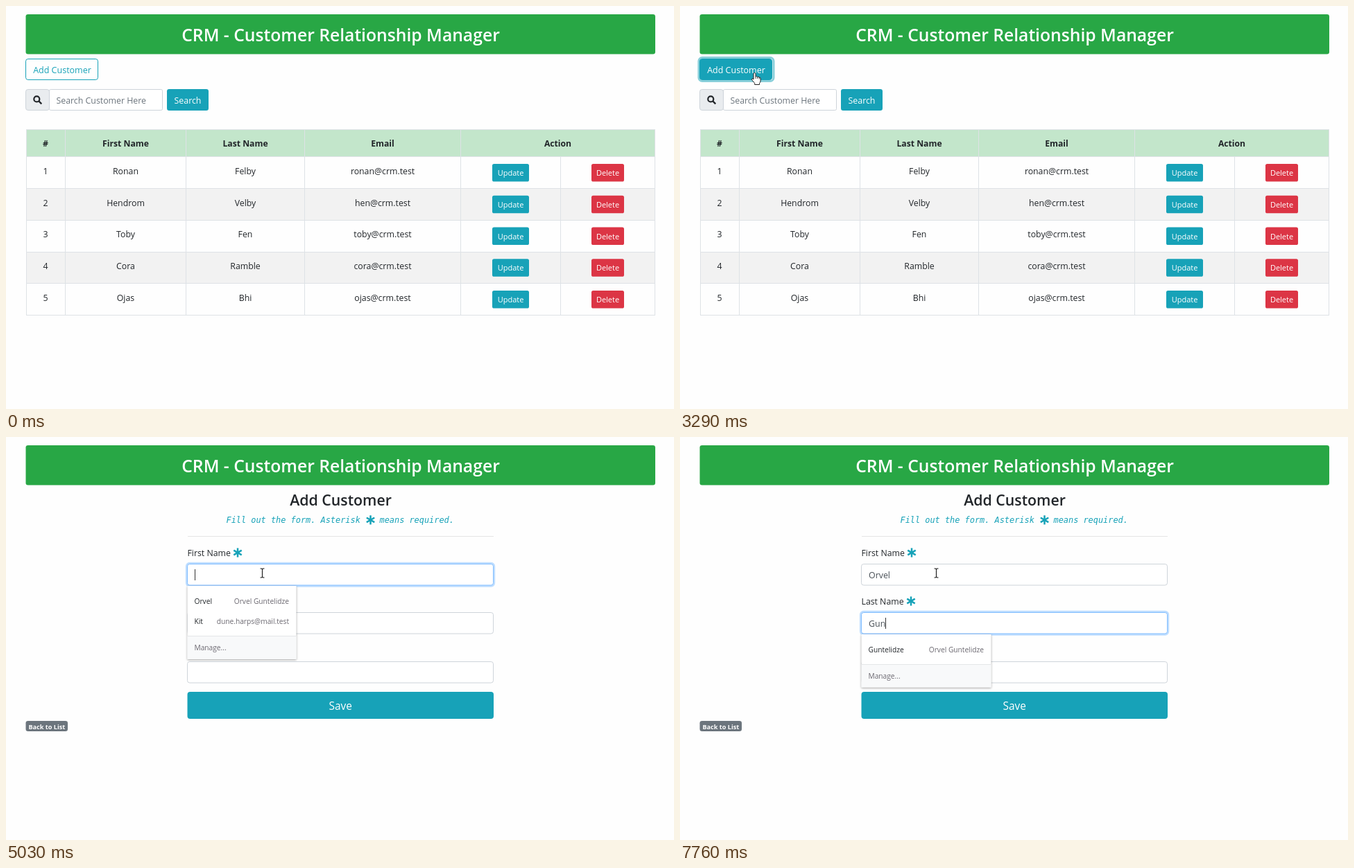
An HTML page that plays this animation: 963 by 582 pixels, repeating every 8000 ms.

```html
<!DOCTYPE html>
<html lang="en">
<head>
<meta charset="utf-8">
<title>Customer manager</title>
<style>
  html, body { margin: 0; width: 100%; height: 100%; overflow: hidden; background: #fefefe; }
  svg { display: block; width: 100%; height: 100%; }
  text { font-family: "Open Sans", sans-serif; white-space: pre; }
  .mono { font-family: "DejaVu Sans Mono", monospace; font-style: italic; }
</style>
</head>
<body>
<svg id="stage" viewBox="0 0 963 582"></svg>
<script>
const LOOP = 8000;
const GREEN = '#28a745', TEAL = '#17a2b8', RED = '#dc3545', INK = '#212529', LINE = '#dee2e6';
const stage = document.getElementById('stage');

const rect = (x, y, w, h, fill, extra = '') =>
  `<rect x="${x}" y="${y}" width="${w}" height="${h}" fill="${fill}" ${extra}/>`;
const box = (x, y, w, h, fill, stroke, r = 3.3) =>
  rect(x + .5, y + .5, w - 1, h - 1, fill, `rx="${r}" stroke="${stroke}"`);
const line = (x1, y1, x2, y2, stroke = LINE) =>
  `<path d="M${x1} ${y1}L${x2} ${y2}" stroke="${stroke}"/>`;
const text = (x, y, size, str, { fill = INK, anchor = 'start', weight = 400, attrs = '' } = {}) =>
  `<text x="${x}" y="${y}" font-size="${size}" fill="${fill}" text-anchor="${anchor}" font-weight="${weight}" ${attrs}>${str}</text>`;
const centered = (x, y, size, str, fill = INK, weight = 400) =>
  text(x, y, size, str, { fill, weight, anchor: 'middle' });

// List page
const COLUMNS = [29.5, 85.5, 259.5, 430.5, 655.5, 799.5, 935.5];
const CENTERS = [57, 172.5, 345, 543];
const ROW_TOP = 217.8, ROW_HEIGHT = 45.75;
const customers = [
  ['Ronan', 'Felby', 'ronan@crm.test'],
  ['Hendrom', 'Velby', 'hen@crm.test'],
  ['Toby', 'Fen', 'toby@crm.test'],
  ['Cora', 'Ramble', 'cora@crm.test'],
  ['Ojas', 'Bhi', 'ojas@crm.test']
];

const header = rect(28.5, 12, 907.5, 57.5, GREEN, 'rx="3.3"') +
  centered(482.5, 51, 24.7, 'CRM - Customer Relationship Manager', '#fff', 600);

function customerRow(cells, i) {
  const y = ROW_TOP + i * ROW_HEIGHT;
  const button = (x, w, label, fill) =>
    rect(x, y + 10.2, w, 25.5, fill, 'rx="2.6"') + centered(x + w / 2, y + 27.4, 11, label, '#fff');
  return (i % 2 ? rect(29, y, 907, ROW_HEIGHT, '#f2f2f2') : '') +
    [i + 1, ...cells].map((cell, c) => centered(CENTERS[c], y + 25, 12.3, cell)).join('') +
    button(701, 53, 'Update', TEAL) + button(844, 47, 'Delete', RED);
}

function table() {
  const heads = ['#', 'First Name', 'Last Name', 'Email'];
  let out = rect(29, 178, 907, 40, '#c3e6cb') + customers.map(customerRow).join('') +
    heads.map((label, c) => centered(CENTERS[c], 203, 12.2, label, INK, 700)).join('') +
    centered(795.5, 203, 12.2, 'Action', INK, 700) + line(29, 178.5, 936, 178.5);
  for (let i = 0; i <= customers.length; i++) {
    const y = Math.floor(ROW_TOP + i * ROW_HEIGHT) + .5;
    out += line(29, y, 936, y);
  }
  return out + COLUMNS.map((x, c) => line(x, c === 5 ? 218 : 178, x, 447)).join('');
}

const searchBar = box(28, 120, 35, 31, '#e9ecef', '#ced4da') +
  box(62, 120, 164, 31, '#fff', '#ced4da', 2) +
  `<g fill="none" stroke="${INK}" stroke-width="2.2"><circle cx="44.3" cy="134.4" r="4"/><path d="M47.3 137.4L51.3 141.4"/></g>` +
  text(72.5, 141, 12.35, 'Search Customer Here', { fill: '#6c757d' }) +
  rect(232, 120, 60, 31, TEAL, 'rx="3.3"') + centered(262, 140.5, 12.4, 'Search', '#fff');

const tableMarkup = table();

function listPage({ hover, press = 0 }) {
  const glow = press ? box(26.5, 74, 109, 35, 'none', TEAL, 5).replace('/>', `stroke-width="3" opacity="${press / 2}"/>`) : '';
  return glow + box(28, 76, 105, 31, hover ? TEAL : '#fefefe', TEAL) +
    centered(81, 96.5, 12.5, 'Add Customer', hover ? '#fff' : TEAL) + searchBar + tableMarkup;
}

// Form page
const FIELD_TOPS = [183, 253, 324];

const asterisk = (x, y) => `<g transform="translate(${x} ${y})" stroke="${TEAL}" stroke-width="2.5">` +
  [0, 60, 120].map(a => `<path d="M0-6.6V6.6" transform="rotate(${a})"/>`).join('') + '</g>';

const mono = (x, str) => text(x, 124, 11.9, str, { fill: TEAL, attrs: 'class="mono"' });

const formBase = centered(482.5, 98.5, 21.3, 'Add Customer', INK, 600) +
  mono(317.5, 'Fill out the form. Asterisk') + asterisk(525.5, 119.8) + mono(538.5, 'means required.') +
  line(262, 143.5, 703, 143.5, '#e5e5e5') +
  [['First Name', 334], ['Last Name', 333], ['Email', 303]].map(([label, x], i) =>
    text(261.5, FIELD_TOPS[i] - 11.3, 12.3, label) + asterisk(x, FIELD_TOPS[i] - 16)).join('') +
  rect(261.5, 368, 441.5, 39, TEAL, 'rx="4"') + centered(482.3, 394, 15.4, 'Save', '#fff') +
  rect(28.5, 410, 60.5, 15, '#6c757d', 'rx="3.3"') +
  centered(58.8, 421.6, 9.15, 'Back to List', '#fff', 700);

function field(top, value = '', glow = 0) {
  return box(261, top, 442, 31.5, '#fff', '#ced4da') +
    (glow ? `<g opacity="${glow}">` + rect(260.2, top - .8, 443.6, 33.1, 'none', 'rx="4.5" stroke="#bfdeff" stroke-width="2.7"') +
      box(261, top, 442, 31.5, '#fff', '#80bdff') + '</g>' : '') +
    text(272, top + 21, 12.4, value, { fill: '#495057' });
}

function suggestions(top, width, rows) {
  const foot = 43 + 29.3 * (rows.length - 1), height = foot + 33.5;
  const right = 261.5 + width;
  return rect(261.5, top, width, height, '#fff', 'style="filter:drop-shadow(0 1px 1.5px #0006)"') +
    rect(261.5, top + foot, width, 33.5, '#f8f9fa') +
    line(261.5, Math.floor(top + foot) + .5, right, Math.floor(top + foot) + .5, '#e4e6e8') +
    rows.map(([value, detail], i) => text(271.5, top + 26 + 29.3 * i, 10.2, value) +
      text(right - 10.5, top + 26 + 29.3 * i, 10.2, detail, { fill: '#6b6870', anchor: 'end' })).join('') +
    text(271.5, top + foot + 20.8, 10.2, 'Manage...', { fill: '#6b6870' });
}

const FIRST = 'Orvel', LAST = 'Guntelidze', FULL = FIRST + ' ' + LAST;
const menus = {
  all: suggestions(215, 157, [[FIRST, FULL], ['Kit', 'dune.harps@mail.test']]),
  first: suggestions(215, 147, [[FIRST, FULL]]),
  last: suggestions(285, 187, [[LAST, FULL]])
};

function formPage({ values = [], glow = [], caret, menu }) {
  return formBase + FIELD_TOPS.map((top, i) =>
    `<g id="field${i}">${field(top, values[i], glow[i])}</g>`).join('') +
    (menu ? menus[menu] : '') +
    (caret === undefined ? '' : `<path id="caret" stroke="#333"/>`);
}

function placeCaret({ caret }) {
  if (caret === undefined) return;
  const width = stage.querySelector(`#field${caret} text`).getComputedTextLength();
  const x = Math.floor(272 + width) + .5, y = FIELD_TOPS[caret] + 8;
  stage.querySelector('#caret').setAttribute('d', `M${x} ${y}v16`);
}

// Pointers, drawn from their hot spot
const pointers = {
  arrow: '<path d="M.5.5V13.5L3.5 10.8L5.7 15.3L7.6 14.4L5.5 10H9.5Z" fill="#fff" stroke="#222"/>',
  beam: '<path d="M-3-6.5H-1L0-5.5L1-6.5H3M0-5.5V5.5M-3 6.5H-1L0 5.5L1 6.5H3" fill="none" stroke="#222" stroke-width="1.2"/>',
  hand: '<path d="M-1.5 10V1.5Q0-.8 1.5 1.5V6Q3 4.8 4 6.5Q5.7 5.5 6.5 7.2Q8.6 6.6 8.6 9V12Q8.4 14.5 7 15.5V17.5H.2V15.5L-4 10.5Q-4.2 8.4-2.5 9Z" fill="#fff" stroke="#222"/>' +
    '<path d="M1.5 6V9M4 6.7V9M6.5 7.4V9.5" stroke="#222" stroke-width=".8"/>'
};

function pointer({ at, click }) {
  if (!at) return '';
  const [kind, x, y] = at;
  return (click ? `<circle cx="${x - .8}" cy="${y}" r="9.7" fill="#ffff3c" opacity=".85"/>` : '') +
    `<g transform="translate(${x} ${y})">${pointers[kind]}</g>`;
}

const list = (time, at, rest) => ({ time, page: listPage, at, ...rest });
const form = (time, at, rest) => ({ time, page: formPage, at, ...rest });
const onButton = ['hand', 107.5, 96], inField = ['beam', 362, 199.5], resting = ['beam', 369.5, 196.5];

const steps = [
  list(0),
  list(520, ['arrow', 799, 564]),
  list(770, ['arrow', 660, 468]),
  list(1020, ['arrow', 490, 368]),
  list(1270, ['arrow', 350, 308]),
  list(1520, ['arrow', 296, 293]),
  list(1790, ['arrow', 240, 238]),
  list(2040, ['arrow', 165, 165]),
  list(2290, ['beam', 123.5, 123.5]),
  list(2540, ['hand', 110, 99], { hover: true }),
  list(2780, onButton, { hover: true }),
  list(3030, onButton, { hover: true, press: .6, click: true }),
  list(3290, onButton, { hover: true, press: 1 }),
  form(3530, ['arrow', 175, 109.5]),
  form(3780, ['arrow', 290, 165]),
  form(4030, inField),
  form(4530, inField, { click: true, caret: 0, menu: 'all', glow: [.15] }),
  form(4780, ['beam', 366, 198], { caret: 0, menu: 'all', glow: [1] }),
  form(5030, resting, { caret: 0, menu: 'all', glow: [1] }),
  ...[[5780, 1], [6020, 3], [6260, 5]].map(([time, n]) =>
    form(time, resting, { values: [FIRST.slice(0, n)], caret: 0, menu: 'first', glow: [1] })),
  form(6530, resting, { values: [FIRST], caret: 1, glow: [.4, .6] }),
  form(6760, resting, { values: [FIRST], caret: 1, glow: [0, 1] }),
  ...[7260, 7510, 7760].map((time, i) =>
    form(time, resting, { values: [FIRST, LAST.slice(0, i + 1)], caret: 1, menu: 'last', glow: [0, 1] }))
];

let shown;
function draw(now) {
  const time = now % LOOP;
  const step = steps.findLast(s => s.time <= time);
  if (step !== shown) {
    stage.innerHTML = header + step.page(step) + pointer(step);
    placeCaret(step);
    shown = step;
  }
}

const start = performance.now();
function tick() {
  draw(performance.now() - start);
  requestAnimationFrame(tick);
}
tick();
</script>
</body>
</html>
```
